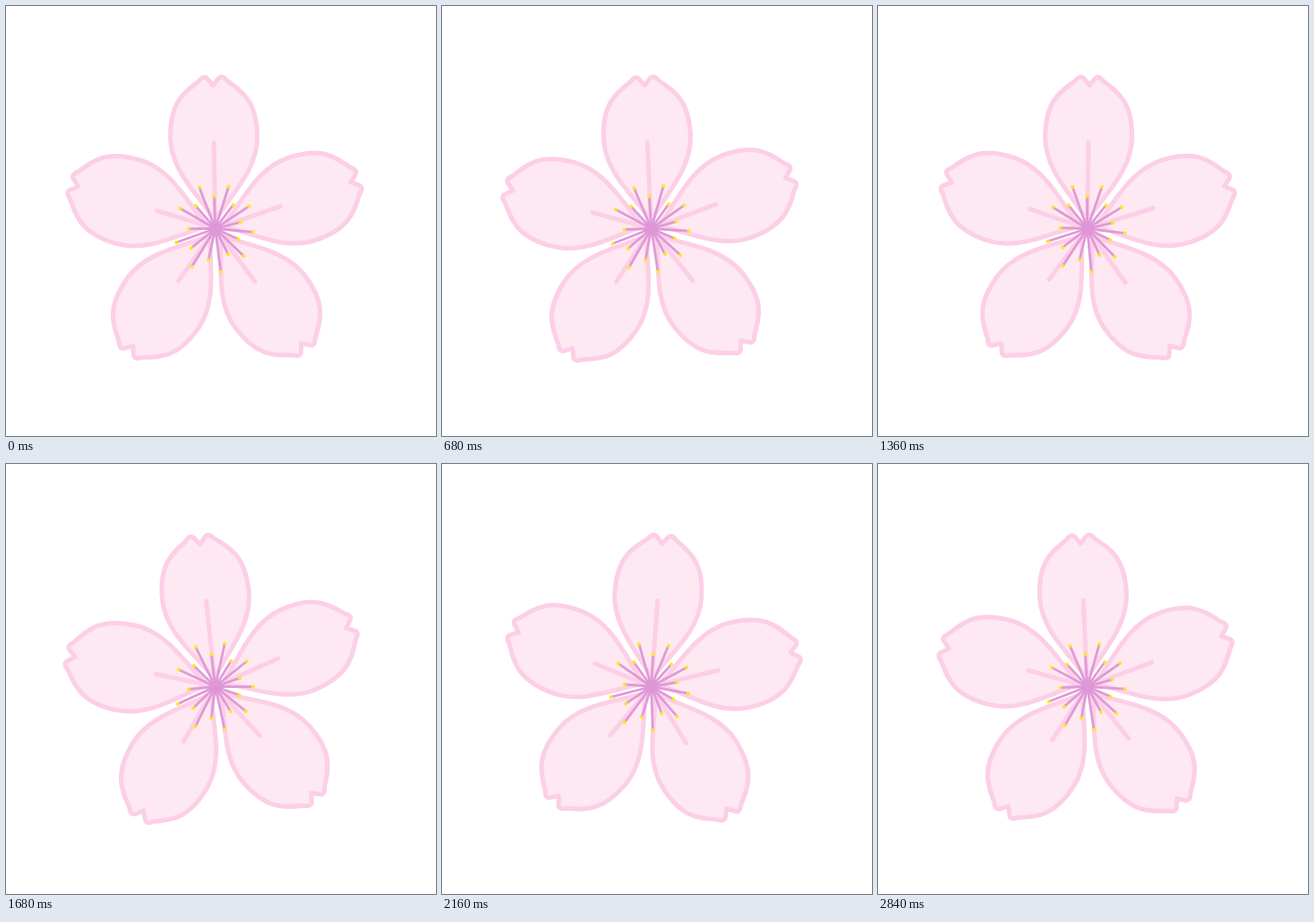
Animation, 480 px wide and 480 px high, one loop 2880 ms. Source, as an HTML page:

```html
<!DOCTYPE html>
<html lang="en">
<head>
<meta charset="utf-8">
<title>Swaying blossom</title>
<style>
  html, body { margin: 0; width: 100%; height: 100%; overflow: hidden; background: #fff; }
  svg { display: block; width: 100%; height: 100%; }
  path, line { stroke-linecap: round; stroke-linejoin: round; }
  .petal { fill: #fee8f2; stroke: #fccfe6; stroke-width: 5; }
  .vein { stroke: #fccfe6; stroke-width: 5; }
  .stamen { stroke: #df9ad8; stroke-width: 2.8; }
  .core { fill: #df96d6; }
  .tip { fill: #ffe81c; }
</style>
</head>
<body>
<svg viewBox="0 0 480 480"><g id="flower"></g></svg>
<script>
const PETALS = 5, STAMENS = 18;
const PERIOD = 960, POSE = 80; // ms
const STEP = 1.72; // degrees
const flower = document.getElementById('flower');

// Half a petal from base to notch; the other half is its mirror image
const half = side => `M0 -8C${12 * side} -32 ${48.5 * side} -62 ${48.5 * side} -102` +
  `S${33 * side} -152 ${15.5 * side} -165Q${9.5 * side} -173 ${5 * side} -166L0 -160`;

function add(name, attrs) {
  const el = document.createElementNS('http://www.w3.org/2000/svg', name);
  for (const key in attrs) el.setAttribute(key, attrs[key]);
  flower.append(el);
}

for (let i = 0; i < PETALS; i++) {
  const transform = `rotate(${i * 360 / PETALS - 0.9})`;
  const vein = i ? 80 - 3 * i : 96;
  add('path', { class: 'petal', d: half(1) + half(-1), transform });
  add('line', { class: 'vein', y1: -12, y2: -vein, transform });
}

// Long and short stamens alternate, with a gentle wave in their lengths
for (let i = 0; i < STAMENS; i++) {
  const transform = `rotate(${300 + i * 19.4})`;
  const length = (i % 2 ? 32 : 46) + 4 * Math.cos(0.6 * (i - 3));
  add('line', { class: 'stamen', y2: -length, transform });
  add('circle', { class: 'tip', cy: -length, r: 2, transform });
}
add('circle', { class: 'core', r: 7 });

// Sway in held poses that linger at the middle and at both ends
function draw() {
  const pose = Math.floor(performance.now() / POSE);
  const swing = Math.sin(2 * Math.PI * (pose - 0.5) * POSE / PERIOD);
  const lean = Math.round(3 * swing ** 3);
  flower.setAttribute('transform', `translate(233.6 248.5) rotate(${lean * STEP})`);
  requestAnimationFrame(draw);
}
draw();
</script>
</body>
</html>
```
